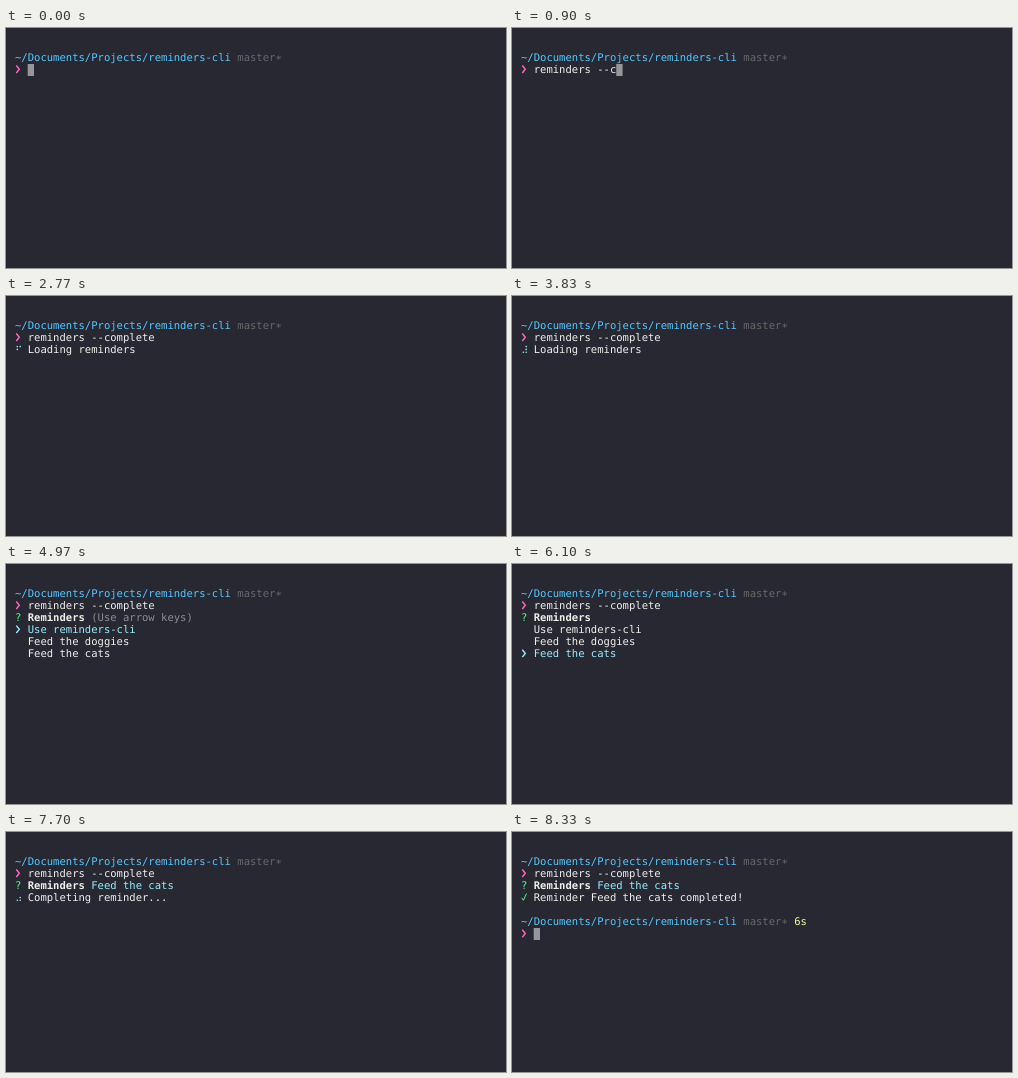
An HTML page for the animation above (8430 ms loop, 500x240 px).

```html
<!DOCTYPE html>
<html lang="en">
<head>
<meta charset="utf-8">
<title>Terminal reminders</title>
<style>
  html, body { margin: 0; width: 100%; height: 100%; overflow: hidden; background: #282833; }
  svg { display: block; width: 500px; height: 240px; }
  text {
    font: 10.55px "DejaVu Sans Mono", "Liberation Mono", monospace;
    text-rendering: geometricPrecision;
    white-space: pre;
  }
  .bold { font-weight: bold; }
</style>
</head>
<body>
<svg viewBox="0 0 500 240">
  <rect width="500" height="240" fill="#282833"/>
  <g id="screen"></g>
</svg>
<script>
const LOOP = 8430;
const CELL = 6.352, LINE = 12.05, LEFT = 9, TOP = 23.8;
const C = {
  fg: '#eff0eb', blue: '#57c7ff', pink: '#ff6ac1', cyan: '#9aedfe', green: '#5af78e',
  yellow: '#f3f99d', gray: '#686868', dim: '#8c8d91', cursor: '#97979b'
};
const COMMAND = 'reminders --complete';
const ITEMS = ['Use reminders-cli', 'Feed the doggies', 'Feed the cats'];
const SPINNER = '⠋⠙⠹⠸⠼⠴⠦⠧⠇⠏';

// Typing bursts: start, end, characters already typed, characters after the burst
const BURSTS = [[30, 430, 0, 9], [570, 630, 9, 12], [900, 1400, 12, 20]];
const T = { enter: 1600, load: 2000, list: 4400, down1: 5000, down2: 5500,
            pick: 6430, done: 7800, prompt: 7900 };

const screen = document.getElementById('screen');
const colX = col => LEFT + col * CELL;
const rowTop = row => TOP + row * LINE;

function text(row, col, str, color, cls = '', dy = 0) {
  return `<text x="${colX(col)}" y="${rowTop(row) + 8.9 + dy}" fill="${color}" class="${cls}">${str}</text>`;
}

function stroke(row, points, color, width) {
  return `<polyline transform="translate(${LEFT} ${rowTop(row)})" points="${points}" fill="none" ` +
    `stroke="${color}" stroke-width="${width}"/>`;
}

const chevron = (row, color) => stroke(row, '1.3,1.7 4.3,5.4 1.3,9.1', color, 1.4);
const check = row => stroke(row, '.8,6 2.4,8.3 5.5,1.6', C.green, 1);

function cursor(row, col) {
  const y = Math.round(rowTop(row));
  return `<rect x="${colX(col)}" y="${y}" width="6.3" height="12" fill="${C.cursor}"/>`;
}

function prompt(row) {
  return text(row, 0, '~/Documents/Projects/reminders-cli', C.blue) +
    text(row, 35, 'master', C.gray) +
    text(row, 41, '*', C.gray, '', 1.8) +
    chevron(row + 1, C.pink);
}

// Braille bits 0-2 are the left column, bits 3-5 the right one
function spinner(row, step) {
  const bits = SPINNER.charCodeAt(((step % 10) + 10) % 10) - 0x2800;
  let out = '';
  for (let i = 0; i < 6; i++) {
    if (!(bits >> i & 1)) continue;
    const x = LEFT + (i < 3 ? 2.3 : 5.2), y = rowTop(row) + 2.7 + (i % 3) * 2.8;
    out += `<circle cx="${x}" cy="${y}" r=".8" fill="${C.cyan}"/>`;
  }
  return out;
}

function typedCount(t) {
  let count = 0;
  for (const [start, end, from, to] of BURSTS) {
    if (t < start) break;
    const p = Math.min(1, (t - start) / (end - start));
    count = from + 1 + Math.floor(p * (to - from - 1));
  }
  return count;
}

function question() {
  return text(2, 0, '?', C.green) + text(2, 2, 'Reminders', C.fg, 'bold');
}

function list(t) {
  const selected = t < T.down1 ? 0 : t < T.down2 ? 1 : 2;
  const hint = t < T.down1 ? text(2, 12, '(Use arrow keys)', C.dim) : '';
  return question() + hint + chevron(3 + selected, C.cyan) +
    ITEMS.map((item, i) => text(3 + i, 2, item, i === selected ? C.cyan : C.fg)).join('');
}

function result(t) {
  const head = question() + text(2, 12, ITEMS[2], C.cyan);
  if (t < T.done) {
    return head + spinner(3, Math.floor((t - T.pick) / 80)) +
      text(3, 2, 'Completing reminder...', C.fg);
  }
  const done = head + check(3) + text(3, 2, `Reminder ${ITEMS[2]} completed!`, C.fg);
  if (t < T.prompt) return done;
  return done + prompt(5) + text(5, 43, '6s', C.yellow) + cursor(6, 2);
}

// The spinner stalls briefly while the list is being fetched
function loading(t) {
  const time = t > 2530 && t < 2700 ? 2530 : t;
  return spinner(2, 4 + Math.floor((time - 3830) / 80)) + text(2, 2, 'Loading reminders', C.fg);
}

function body(t) {
  if (t < T.enter) return cursor(1, 2 + typedCount(t));
  if (t < T.load) return cursor(2, 0);
  if (t < T.list) return loading(t);
  return t < T.pick ? list(t) : result(t);
}

let shown = '';
function draw(t) {
  const markup = prompt(0) + text(1, 2, COMMAND.slice(0, typedCount(t)), C.fg) + body(t);
  if (markup !== shown) screen.innerHTML = shown = markup;
}

const begin = performance.now();
function tick() {
  draw((performance.now() - begin) % LOOP);
  requestAnimationFrame(tick);
}
tick();
</script>
</body>
</html>
```
